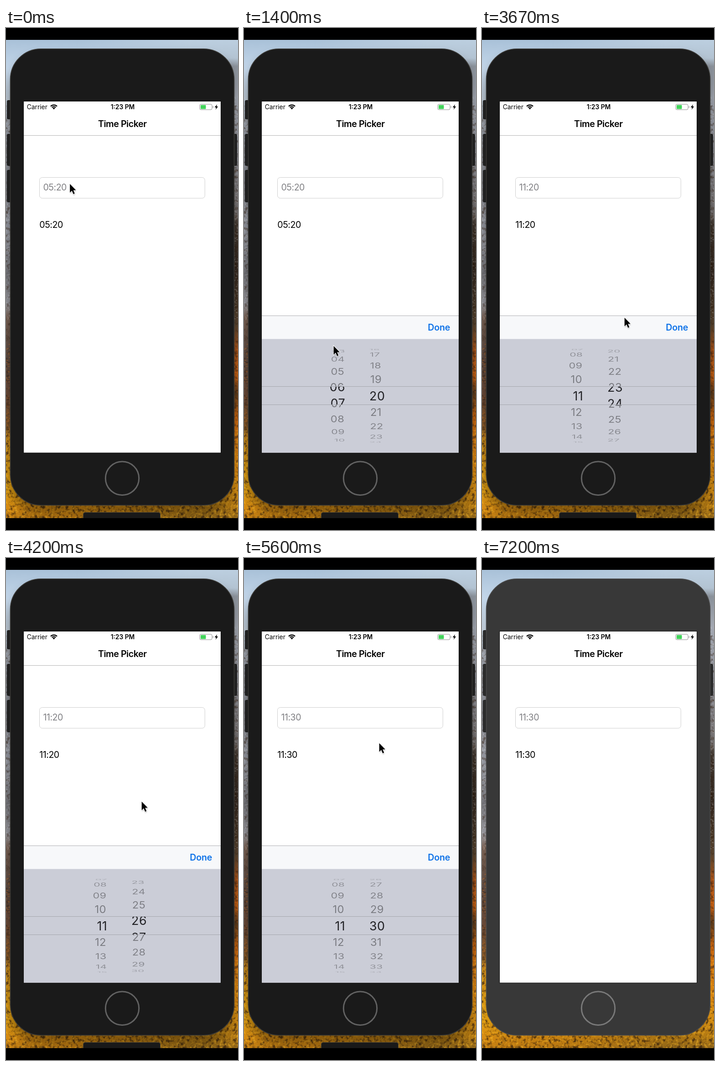
An HTML page for the animation above (8070 ms loop, 509x1100 px).

```html
<!DOCTYPE html>
<html lang="en">
<head>
<meta charset="utf-8">
<title>Time Picker</title>
<style>
  html, body { margin: 0; width: 100%; height: 100%; overflow: hidden; background: #000; }
  svg { display: block; width: 100vw; height: 100vh; }
  text { font-family: Inter, sans-serif; white-space: pre; }
  .body { font-size: 19.6px; letter-spacing: -.5px; font-variant-ligatures: no-contextual; }
  .head { font-size: 19.6px; letter-spacing: -.45px; font-weight: 600; }
  .status { font-size: 13.8px; }
  #done { letter-spacing: -.25px; }
  #dim text, #lit text { font-size: 24px; letter-spacing: .4px; }
</style>
</head>
<body>
<svg viewBox="0 0 509 1100" xmlns="http://www.w3.org/2000/svg">
  <defs>
    <linearGradient id="leftTone" x1="0" y1="0" x2="0" y2="1"></linearGradient>
    <linearGradient id="rightTone" x1="0" y1="0" x2="0" y2="1"></linearGradient>
    <linearGradient id="across"><stop offset=".3" stop-color="#000"/><stop offset=".8" stop-color="#fff"/></linearGradient>
    <mask id="rightSide"><rect width="509" height="1100" fill="url(#across)"/></mask>
    <filter id="soft" x="-20%" y="-10%" width="140%" height="120%"><feGaussianBlur stdDeviation="13"/></filter>
    <filter id="drop" x="-50%" y="-50%" width="200%" height="200%"><feGaussianBlur stdDeviation="1.6"/></filter>
    <filter id="shade" x="0" y="0" width="100%" height="100%" color-interpolation-filters="sRGB">
      <feTurbulence type="fractalNoise" baseFrequency=".13" numOctaves="3" seed="4"/>
      <feColorMatrix values="0 0 0 0 .2  0 0 0 0 .12  0 0 0 0 .06  3.6 0 0 0 -1.75"/>
    </filter>
    <filter id="glint" x="0" y="0" width="100%" height="100%" color-interpolation-filters="sRGB">
      <feTurbulence type="fractalNoise" baseFrequency=".16" numOctaves="3" seed="9"/>
      <feColorMatrix values="0 0 0 0 1  0 0 0 0 .74  0 0 0 0 .16  0 3.4 0 0 -1.75"/>
    </filter>
    <clipPath id="wall"><rect y="26" width="509" height="1048"/></clipPath>
    <clipPath id="screen"><rect x="39" y="161" width="432" height="769.5"/></clipPath>
    <clipPath id="band"><rect x="39" y="786" width="432" height="39.5"/></clipPath>
    <clipPath id="offBand"><path d="M39 703H471V785.5H39ZM39 826H471V908.5H39Z"/></clipPath>
  </defs>

  <g clip-path="url(#wall)">
    <rect y="26" width="509" height="1048" fill="url(#leftTone)"/>
    <rect y="26" width="509" height="1048" fill="url(#rightTone)" mask="url(#rightSide)"/>
    <rect y="880" width="509" height="194" filter="url(#shade)" opacity=".75"/>
    <rect y="880" width="509" height="194" filter="url(#glint)" opacity=".6"/>
    <rect y="170" width="12" height="710" filter="url(#shade)" opacity=".5"/>
    <rect x="497" y="170" width="12" height="710" filter="url(#shade)" opacity=".6"/>
    <g id="specks"></g>
    <rect id="shadow" x="9" y="66" width="492" height="1001" rx="67" filter="url(#soft)"/>
    <rect id="dock" x="169.5" y="1061.5" width="169" height="30" rx="4" fill="#191919" stroke="#4a4436"/>
  </g>

  <g id="buttons" stroke="#111" stroke-width=".8">
    <rect x="2.5" y="158.5" width="9" height="41" rx="2"/>
    <rect x="2.5" y="232.5" width="9" height="69" rx="2"/>
    <rect x="2.5" y="311.5" width="9" height="70" rx="2"/>
    <rect x="497.5" y="232.5" width="9" height="69" rx="2"/>
  </g>
  <rect id="case" x="9.5" y="45.8" width="491" height="1000" rx="67" stroke-width="1.6"/>
  <circle id="home" cx="255" cy="986.7" r="36.7" fill="none" stroke-width="3"/>
  <rect x="38.5" y="160.5" width="433" height="770.5" fill="none" stroke="#101010"/>

  <g clip-path="url(#screen)">
    <rect x="39" y="161" width="432" height="770" fill="#fff"/>
    <text class="status" x="45.7" y="178">Carrier</text>
    <path d="M98 171.6A9.9 9.9 0 0 1 112 171.6M100.7 174.2A6.2 6.2 0 0 1 109.3 174.2" fill="none" stroke="#000" stroke-width="2.2"/>
    <path d="M105 178.6L102.2 175.8A4 4 0 0 1 107.8 175.8Z"/>
    <text class="status" x="256" y="178" text-anchor="middle" font-weight="600">1:23 PM</text>
    <rect x="425" y="167.2" width="27" height="11.8" rx="2.6" fill="#fff" stroke="#8c8c8c"/>
    <rect x="427" y="168.7" width="11.5" height="8.8" rx="1" fill="#42d45a"/>
    <path d="M453.6 171.2q1.6 .4 1.6 1.9t-1.6 1.9z" fill="#8c8c8c"/>
    <path d="M463 167.3L457.8 174H461L459.8 179L465.2 172H462Z"/>
    <text class="head" x="255.2" y="216.8" text-anchor="middle">Time Picker</text>
    <rect x="39" y="235" width="432" height="1" fill="#b4b4b5"/>
    <rect x="73.5" y="327.5" width="362.8" height="45.5" rx="6" fill="#fff" stroke="#cfcfcf"/>
    <text id="field" class="body" x="81.5" y="356.3" fill="#808084"></text>
    <text id="label" class="body" x="73.3" y="438.3"></text>

    <g id="panel">
      <rect x="39" y="630" width="432" height="52" fill="#f7f8fa"/>
      <rect x="39" y="630" width="432" height="1" fill="#b0b1b4"/>
      <text id="done" class="head" x="452" y="663.2" text-anchor="end" fill="#0e72e8">Done</text>
      <rect x="39" y="681.5" width="432" height="250" fill="#cbcdd7"/>
      <g id="dim" clip-path="url(#offBand)"></g>
      <g id="lit" clip-path="url(#band)"></g>
      <path d="M39 785.5H471M39 825.5H471" stroke="#a5a7ae"/>
    </g>
  </g>

  <g id="cursor">
    <path d="M0 0V19L4.4 14.9L7.6 22.2L10.6 20.9L7.5 13.8L13.2 13.5Z" transform="translate(.5 2)" opacity=".4" filter="url(#drop)"/>
    <path d="M0 0V19L4.4 14.9L7.6 22.2L10.6 20.9L7.5 13.8L13.2 13.5Z" stroke="#fff" stroke-width="2" paint-order="stroke"/>
  </g>
  <path d="M0 0H509V26H0ZM0 1074H509V1100H0Z"/>
</svg>

<script>
const $ = id => document.getElementById(id);
const NS = 'http://www.w3.org/2000/svg';
const clamp = (v, a = 0, b = 1) => Math.min(b, Math.max(a, v));
const easeOut = v => 1 - (1 - clamp(v)) ** 3;

function add(parent, tag, attrs) {
  const el = document.createElementNS(NS, tag);
  for (const name in attrs) el.setAttribute(name, attrs[name]);
  return parent.appendChild(el);
}

// Wallpaper: vertical tones, given as "y colour" pairs
function tones(id, list) {
  list.split(' ').forEach((item, i, all) => {
    if (i % 2) return;
    add($(id), 'stop', { offset: (item - 26) / 1048, 'stop-color': all[i + 1] });
  });
}
tones('leftTone', '26 #a9c1d8 90 #c4d7ea 160 #c0ccd8 215 #9a9fa8 330 #878990 440 #979aa3 ' +
  '540 #77777c 605 #9c9ca2 635 #7a6254 720 #5f4c42 810 #6c4b38 875 #80572a 905 #cf9116 1010 #e2a012 1050 #d88c12 1074 #bd7a12');
tones('rightTone', '26 #bccfe0 66 #b3c3d2 84 #8b929b 150 #a9aeb8 250 #9699a2 330 #858489 410 #75706f ' +
  '428 #41372f 540 #33271e 650 #5b4630 705 #a9541a 760 #cf6414 800 #5a3a1c 850 #c9650f 920 #dd8210 1010 #dd9212 1050 #b67c14 1074 #94691a');

let seed = 7;
const rnd = () => (seed = (seed * 16807) % 2147483647) / 2147483647;

function speckle(count, top, bottom, fill, opacity) {
  let d = '';
  for (let i = 0; i < count; i++) {
    const x = rnd() * 11, y = top + rnd() * (bottom - top), w = 1 + rnd() * 3;
    d += `M${(rnd() < .5 ? x : 509 - x).toFixed(1)} ${y.toFixed(1)}h${w.toFixed(1)}v${(1 + rnd() * 2).toFixed(1)}h${-w.toFixed(1)}z`;
  }
  add($('specks'), 'path', { d, fill, opacity });
}
speckle(420, 150, 640, '#fff', .2);
speckle(200, 690, 980, '#ff8a20', .28);

// Picker wheels
const MID = 806, RADIUS = 103, STEP = 20.25 * Math.PI / 180, VANISH = 250;
const columns = [
  { edge: 219.8, anchor: 'end', zoomAt: 200 },
  { edge: 277.1, anchor: 'start', zoomAt: 294 }
];
for (const col of columns) {
  col.rows = [];
  for (let i = -5; i <= 5; i++) {
    const attrs = { 'text-anchor': col.anchor };
    col.rows.push({ i, dim: add($('dim'), 'text', attrs), lit: add($('lit'), 'text', { ...attrs, fill: '#222226' }) });
  }
}

function turn(col, pos) {
  const base = Math.round(pos);
  for (const { i, dim, lit } of col.rows) {
    const angle = (base + i - pos) * STEP;
    const c = Math.cos(angle), y = MID + RADIUS * Math.sin(angle);
    const hidden = Math.abs(angle) > 1.52;
    const near = Math.abs(angle) < .6;
    dim.style.display = hidden ? 'none' : '';
    lit.style.display = near ? '' : 'none';
    dim.textContent = lit.textContent = String(base + i).padStart(2, '0');
    if (hidden) continue;
    const s = 1 - .1 * (1 - c);
    const x = VANISH + (col.edge - VANISH) * s;
    dim.setAttribute('transform', `translate(${x} ${y}) scale(${s} ${c * s}) translate(0 8.7)`);
    dim.setAttribute('opacity', .41 * Math.sqrt(c));
    const zx = col.zoomAt + (col.edge - col.zoomAt) * 1.12;
    lit.setAttribute('transform', `translate(${zx} ${y}) scale(1.12 ${1.12 * c}) translate(0 8.7)`);
  }
}

// Time runs in ticks of 1/15 s
const TICK = 1000 / 15, LOOP = 8070;
const path = [
  [8, 140.5, 342], [10, 150, 410], [13, 186, 640], [15, 203, 748], [16, 205, 764], [17, 204, 762],
  [19, 201, 736], [21, 197, 697], [24, 192, 610], [26, 191, 566], [28, 191, 566], [32, 191, 541],
  [34, 191, 541], [35, 191, 540], [37, 194, 546], [40, 240, 640], [43, 300, 748], [45, 321, 776],
  [47, 314, 773], [48, 313, 772], [50, 313, 746], [52, 313, 704], [55, 313, 635], [58, 303, 592],
  [61, 298, 570], [66, 298, 480], [71, 298, 389], [74, 298, 389], [78, 297, 406], [86, 297, 406],
  [88, 325, 458], [90, 395, 592], [91, 420, 638], [92, 429, 654], [98, 429, 654], [98.9, 507, 652], [99, 507, 652]
];

function cursorAt(k) {
  if (k <= path[0][0]) return path[0].slice(1);
  const n = path.findIndex(p => p[0] >= k);
  if (n < 0) return null;
  const [a, ax, ay] = path[n - 1], [b, bx, by] = path[n];
  const f = (k - a) / (b - a);
  return [ax + (bx - ax) * f, ay + (by - ay) * f];
}

// A drag turns the wheel with the pointer, then it settles on a whole row
function wheelAt(k, from, start, release, startY) {
  if (k < start) return from;
  const y = cursorAt(Math.min(k, release))[1];
  const pos = from + Math.max(0, startY - y) / 36.3;
  return pos + (Math.round(pos) - pos) * easeOut((k - release) / 3);
}

function draw(ms) {
  const k = Math.floor((ms % LOOP + 5) / TICK);

  const awake = k < 108;
  $('case').setAttribute('fill', awake ? '#1a1a1a' : '#383838');
  $('case').setAttribute('stroke', awake ? '#3a3936' : '#4a4a4a');
  $('buttons').setAttribute('fill', awake ? '#202020' : '#2b2b2b');
  $('home').setAttribute('stroke', awake ? '#626262' : '#797979');
  $('shadow').setAttribute('opacity', awake ? .38 : .08);
  $('dock').style.display = awake ? '' : 'none';

  const time = k < 39 ? '05:20' : k < 81 ? '11:20' : '11:30';
  $('field').textContent = $('label').textContent = time;

  const shown = k < 99 ? easeOut(k / 5) : 1 - easeOut((k - 99) / 5);
  $('panel').setAttribute('transform', `translate(0 ${(1 - shown) * 302})`);
  $('done').setAttribute('opacity', k < 94 ? 1 : k < 96 ? .35 : .84);

  turn(columns[0], wheelAt(k, 5, 17, 35, 753));
  turn(columns[1], wheelAt(k, 20, 49, 78, 763));

  const at = cursorAt(k);
  $('cursor').style.display = at ? '' : 'none';
  if (at) $('cursor').setAttribute('transform', `translate(${at[0] - .3} ${at[1] - .3})`);
}

const t0 = performance.now();
function loop() {
  draw(performance.now() - t0);
  requestAnimationFrame(loop);
}
loop();
</script>
</body>
</html>
```
